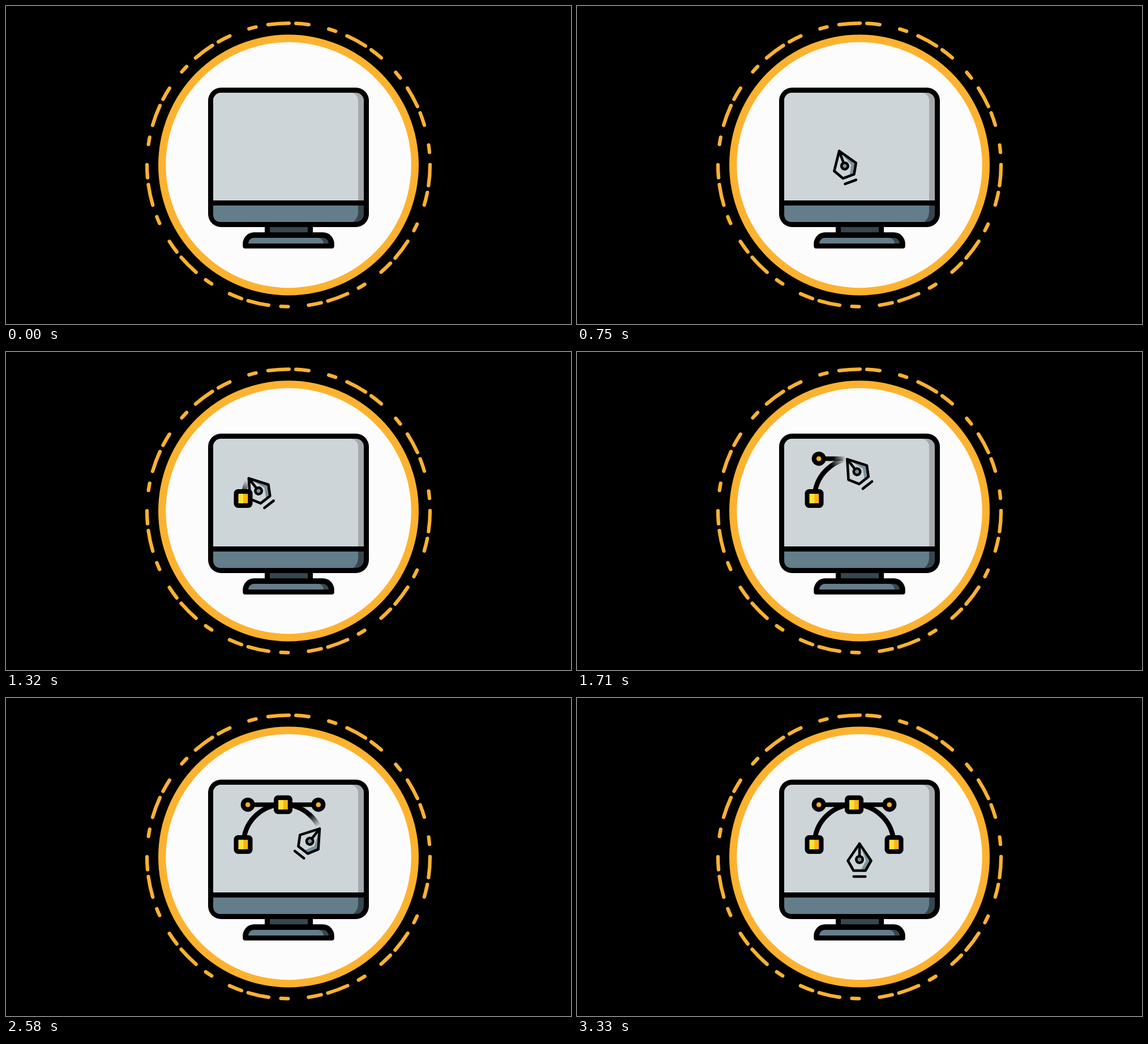
An HTML page with a canvas for the animation above (4560 ms loop, 998 by 561 pixels).

```html
<!DOCTYPE html>
<html lang="en">
<head>
<meta charset="utf-8">
<title>Vector drawing</title>
<style>
html, body { margin: 0; width: 100%; height: 100%; overflow: hidden; background: #000; }
canvas { display: block; }
</style>
</head>
<body>
<canvas id="stage" width="998" height="561"></canvas>
<script>
const W = 998, H = 561, LOOP = 4560, STEP = 30, RAD = Math.PI / 180;
const CX = 499, CY = 280.5;
const ORANGE = '#fdb22f', SCREEN = '#cdd5d8', SLATE = '#647d8a', DARK = '#37474f', SHADE = '#78909c';
const CLEAR = 'rgba(0,0,0,0)';
const ARC = { x: 489.5, y: 258, r: 70 };

// The pen enters, rests, traces the arc from left to right, then returns home.
const ENTER = 210, LANDED = 1080, TRACE = 1180, TRACED = 2740, HOME = 3330;
const TILT = 38;

const view = document.getElementById('stage').getContext('2d');
const layer = makeCanvas();
const backdrop = makeCanvas();

function makeCanvas() {
  const c = document.createElement('canvas');
  c.width = W;
  c.height = H;
  return c.getContext('2d');
}

function progress(t, from, to) {
  return Math.min(1, Math.max(0, (t - from) / (to - from)));
}

function easeOut(u, power) {
  return 1 - (1 - u) ** power;
}

function bezier(a, b, c, u) {
  return a * (1 - u) ** 2 + 2 * b * u * (1 - u) + c * u * u;
}

// Degrees from the top of the arc, moving faster at first.
function penAngle(t) {
  const v = (t - 1320) / 1260;
  return -60 + 127 * v + 72 * v * (1 - v) ** 2;
}

function onArc(t) {
  const a = penAngle(t) * RAD;
  return { x: ARC.x + ARC.r * Math.sin(a), y: ARC.y - ARC.r * Math.cos(a) };
}

function glide(from, bend, to, u) {
  return { x: bezier(from.x, bend.x, to.x, u), y: bezier(from.y, bend.y, to.y, u) };
}

function penPose(t) {
  if (t < TRACE) {
    const u = easeOut(progress(t, ENTER, LANDED), 1.35);
    return { ...glide({ x: 580, y: 288 }, { x: 500, y: 257 }, onArc(TRACE), u), turn: -TILT * u * u };
  }
  if (t < TRACED) {
    const u = progress(t, 1710, 2580) ** 0.85;
    return { ...onArc(t), turn: TILT * (2 * u - 1) };
  }
  const u = easeOut(progress(t, TRACED, HOME), 2);
  return { ...glide(onArc(TRACED), { x: 540, y: 171 }, { x: 499, y: 257 }, u), turn: TILT * (1 - u * u) };
}

function box(g, x, y, w, h, r, fill) {
  g.beginPath();
  g.roundRect(x, y, w, h, r);
  g.fillStyle = fill;
  g.fill();
}

function disc(g, x, y, r, fill) {
  g.beginPath();
  g.arc(x, y, r, 0, Math.PI * 2);
  g.fillStyle = fill;
  g.fill();
}

function line(g, x0, y0, x1, y1) {
  g.beginPath();
  g.moveTo(x0, y0);
  g.lineTo(x1, y1);
  g.stroke();
}

function polygon(g, points) {
  g.beginPath();
  for (const [x, y] of points) g.lineTo(x, y);
  g.closePath();
}

function drawBadge(g) {
  g.fillStyle = '#000';
  g.fillRect(0, 0, W, H);
  disc(g, CX, CY, 230, ORANGE);
  disc(g, CX, CY, 216.7, '#fcfcfc');

  g.strokeStyle = ORANGE;
  g.lineWidth = 6.3;
  g.lineCap = 'round';
  for (let i = 0; i < 11; i++) {
    const top = -90 - i * 360 / 11;
    for (const [from, to] of [[-0.2, 8.3], [13.3, 16.2], [24.5, 29.7]]) {
      g.beginPath();
      g.arc(CX, CY - 0.2, 250, (top - to) * RAD, (top - from) * RAD);
      g.stroke();
    }
  }
}

function drawMonitor(g) {
  box(g, 457, 386, 85, 18, 0, '#000');
  box(g, 466, 390, 67, 10, 0, DARK);
  box(g, 418.3, 399.3, 161.4, 28.5, [20, 20, 4, 4], '#000');
  box(g, 428, 409, 142, 10, [10, 10, 0, 0], DARK);
  box(g, 428, 409, 133, 10, [10, 10, 0, 0], SLATE);

  box(g, 357, 144, 284, 246, 23, '#000');
  box(g, 366, 153, 266, 190, [14, 14, 0, 0], '#a4aaad');
  box(g, 366, 153, 256, 190, [14, 14, 0, 0], SCREEN);
  box(g, 366, 352, 266, 29, [0, 0, 14, 14], DARK);
  g.beginPath();
  g.moveTo(366, 352);
  g.lineTo(622, 352);
  g.lineTo(622, 364);
  g.quadraticCurveTo(621, 376, 613, 381);
  g.lineTo(380, 381);
  g.quadraticCurveTo(366, 381, 366, 367);
  g.fillStyle = SLATE;
  g.fill();
}

function drawNode(g, x, y) {
  box(g, x - 16.5, y - 16.5, 33, 33, 7.5, '#000');
  box(g, x - 8.3, y - 8.3, 16.6, 16.6, 0, '#fdb515');
  box(g, x - 8.3, y - 8.3, 8.5, 16.6, 0, '#ffe237');
}

function drawHandle(g, x, inner) {
  g.strokeStyle = '#000';
  g.lineWidth = 8;
  g.lineCap = 'butt';
  line(g, x, 188.2, inner, 188.2);
  disc(g, x, 188.2, 12.5, '#000');
  disc(g, x, 188.2, 4.3, '#fdb020');
}

// Strokes part of the arc, fading out just behind the pen; angles run from its left end.
function drawArc(g, t, from, to) {
  const edge = Math.min(205, penAngle(Math.min(t, 2900)) + 86);
  const fade = g.createConicGradient(Math.PI, ARC.x, ARC.y);
  fade.addColorStop(Math.max(0, edge - 21) / 360, '#000');
  fade.addColorStop(Math.max(0, edge) / 360, CLEAR);
  g.strokeStyle = t < HOME - 400 ? fade : '#000';
  g.lineWidth = 8.5;
  g.lineCap = 'butt';
  g.beginPath();
  g.arc(ARC.x, ARC.y, ARC.r, (180 + from) * RAD, (180 + to) * RAD);
  g.stroke();
}

function drawPen(g, t) {
  const { x, y, turn } = penPose(t);
  g.save();
  g.globalAlpha = progress(t, ENTER - 30, ENTER + 120);
  g.translate(x, y);
  g.rotate(turn * RAD);
  g.lineWidth = 4.6;
  g.lineCap = g.lineJoin = 'round';
  g.strokeStyle = '#000';

  const nib = [[0, 0], [20.5, 30], [10.5, 47.5], [-10.5, 47.5], [-20.5, 30]];
  polygon(g, nib);
  g.fillStyle = SCREEN;
  g.fill();
  polygon(g, [[0, 0], [20.5, 30], [10.5, 47.5], [2, 47.5], [11.5, 30]]);
  g.fillStyle = SHADE;
  g.fill();
  polygon(g, nib);
  g.stroke();

  line(g, 0, 0, 0, 22);
  disc(g, 0, 28, 8, '#000');
  disc(g, 0, 28, 3.4, SHADE);
  line(g, -10.3, 58, 10.3, 58);
  g.restore();
}

// Reveals a shape from x0 to x1 behind a feathered edge.
function wipe(t, start, end, x0, x1, draw) {
  if (t < start) return;
  const feather = 22 * Math.sign(x1 - x0);
  const edge = x0 + (x1 + feather - x0) * progress(t, start, end);
  layer.clearRect(0, 0, W, H);
  draw(layer);
  const mask = layer.createLinearGradient(edge - feather, 0, edge, 0);
  mask.addColorStop(0, '#000');
  mask.addColorStop(1, CLEAR);
  layer.globalCompositeOperation = 'destination-in';
  layer.fillStyle = mask;
  layer.fillRect(0, 0, W, H);
  layer.globalCompositeOperation = 'source-over';
  view.drawImage(layer.canvas, 0, 0);
}

function render(t) {
  view.drawImage(backdrop.canvas, 0, 0);
  if (t < ENTER) return;
  if (t > TRACE) drawArc(view, t, 6, 90);
  if (t > 2100) drawArc(view, t, 90, 174);
  wipe(t, 1350, 1900, 414, 484, g => drawHandle(g, 427.2, 484));
  wipe(t, 2130, 2480, 495, 565, g => drawHandle(g, 551.8, 495));
  drawPen(view, t);
  wipe(t, 960, 1290, 436, 402, g => drawNode(g, 419, 258.5));
  wipe(t, 1830, 2150, 473, 506, g => drawNode(g, 489.5, 188.3));
  wipe(t, 2660, 2890, 577, 543, g => drawNode(g, 560, 258.5));
}

drawBadge(backdrop);
drawMonitor(backdrop);

const start = performance.now();
function tick() {
  const t = (performance.now() - start) % LOOP;
  render(Math.round(t / STEP) * STEP % LOOP);
  requestAnimationFrame(tick);
}
tick();
</script>
</body>
</html>
```
